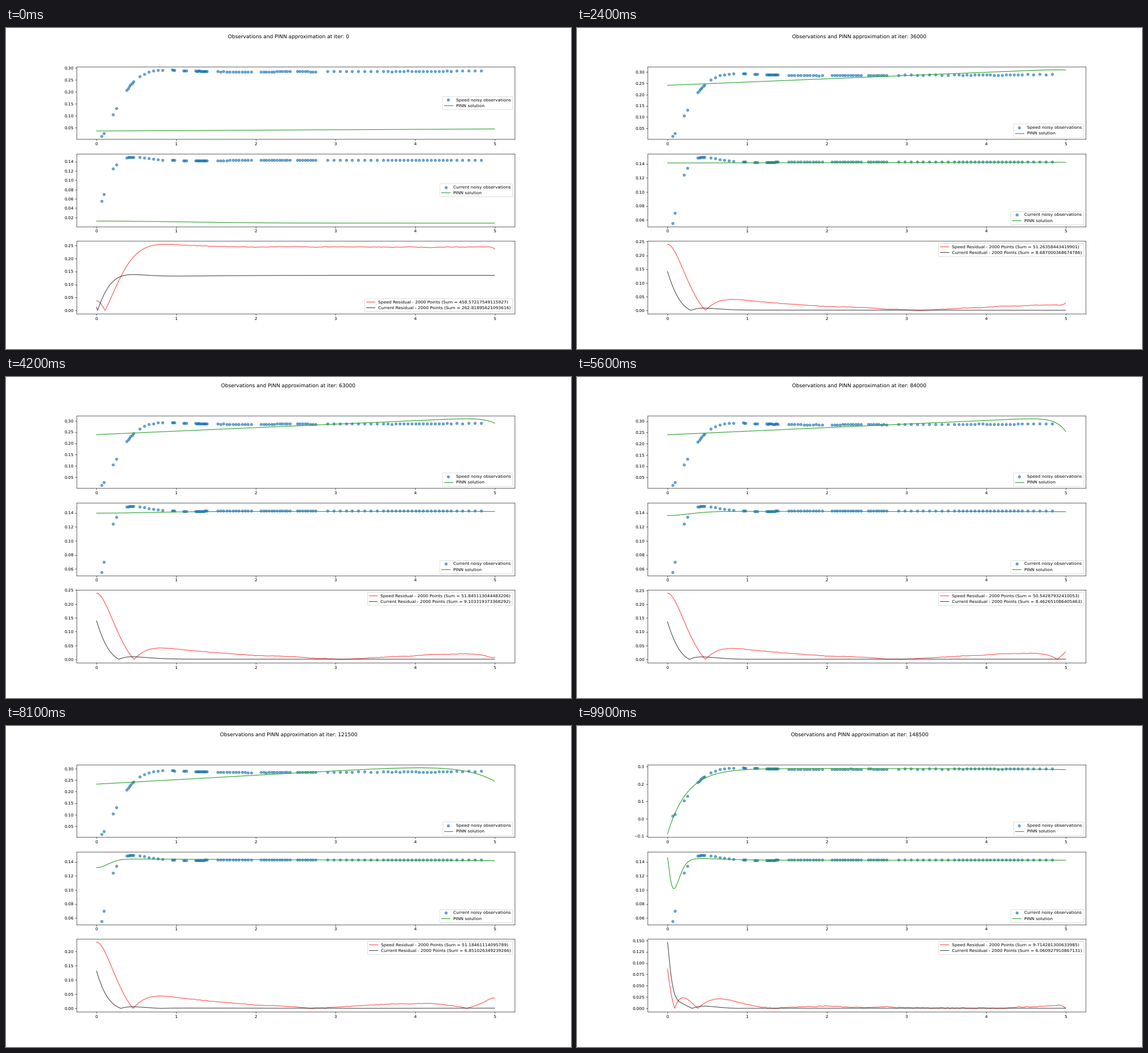
A matplotlib script that plays this animation: 993x564 px, repeating every 10000 ms.

```python
import numpy as np
import matplotlib.pyplot as plt
from matplotlib.animation import FuncAnimation

plt.rcParams["text.hinting"] = "none"
plt.rcParams["font.family"] = "DejaVu Sans"

W, H, DPI = 993, 564, 53.8
FRAMES, STEP = 100, 1500
NAMES = "Speed", "Current"
T = np.linspace(0, 5, 2000)

rng = np.random.default_rng(7)
KNOTS = np.linspace(0, 5, 180)
NOISE = rng.normal(0, .0006, KNOTS.size)
DRIFT = np.interp(KNOTS, np.linspace(0, 5, 25), rng.normal(0, .0011, 25))


def step_response(t, gain, decay, w, b):
    return gain * (1 - np.exp(-decay * t) * (np.cos(w * t) + b * np.sin(w * t)))


def speed(t):
    """Measured motor speed: damped step response with sensor noise."""
    noise = np.interp(t, KNOTS, NOISE + DRIFT) * np.clip(2 * t - .6, 0, 1)
    trend = .004 * (t / 5) ** 4 - .01 * np.exp((t - 5) / .03)
    return step_response(t, .285, 4.15, 3.65, 1.137) + trend + noise


def current(t):
    return step_response(t, .1427, 5.6, 4.4, -.233)


# Observations come in clumps: first time, last time, count
CLUMPS = [(.067, .089, 2), (.21, .249, 2), (.38, .464, 6), (.54, .825, 6),
          (.95, .975, 3), (1.09, 1.125, 3), (1.243, 1.386, 12),
          (1.52, 1.94, 12), (2.065, 2.43, 12), (2.52, 2.75, 8),
          (2.9, 3.6, 10), (3.66, 4.45, 17), (4.52, 4.827, 5)]
OBS_T = np.concatenate([np.linspace(*c) for c in CLUMPS])
TRUTH = speed(T), current(T)
OBS = speed(OBS_T), current(OBS_T)

# Training state at key frames:
#   speed start, slope, end drop, drop width, initial dip;
#   current level, slope, lag, lag width, notch; both residual sums
STAGES = {
    0: (.0368, .0017, 0, .15, 0, .0077, 0, -.0045, 1.5, 0,
        458.57217549115927, 262.81895621093616),
    15: (.238, .0155, .0215, .19, 0, .1413, .0001, 0, 1, 0,
         51.04928017669871, 9.061036985393427),
    24: (.2405, .0145, .0047, .15, 0, .1413, .0002, 0, 1, 0,
         51.26358443419901, 8.687000368674786),
    42: (.2385, .0155, .027, .14, 0, .142, 0, .0024, .9, 0,
         51.845113044483206, 9.103319373368292),
    56: (.2394, .016, .065, .127, 0, .1422, -.0001, .006, .38, 0,
         50.54287932410053, 8.462651086405463),
    81: (.233, .0194, .0845, .395, 0, .1443, -.0005, .0125, .2, 0,
         51.18461114095789, 6.851026349239266),
    99: (.2895, -.0002, .006, 1, .377, .1424, 0, -.0035, .75, .044,
         9.714281300633985, 6.060927910867131),
}
KEYS = list(STAGES)
STATES = np.array(list(STAGES.values()))


def state(k):
    """Blend neighbouring stages; the first and last blends settle early."""
    j = min(np.searchsorted(KEYS, k, "right") - 1, len(KEYS) - 2)
    s = (k - KEYS[j]) / (KEYS[j + 1] - KEYS[j])
    if j == 0:
        s = 1 - np.exp(-1.5 * k)
    elif j == len(KEYS) - 2:
        s = 1 - (1 - s) ** 4
    return (1 - s) * STATES[j] + s * STATES[j + 1]


def solve(v0, slope, drop, width, dip, c0, c_slope, lag, lag_width, notch):
    v = v0 + slope * T - drop * np.exp((T - 5) / width) - dip * np.exp(-T / .247)
    x = (T / .08) ** 1.3
    c = (c0 + c_slope * T - lag * np.exp(-(T / lag_width) ** 2)
         - notch * x * np.exp(1 - x))
    return v, c


def fit_y(ax, *data):
    lo = min(d.min() for d in data)
    hi = max(d.max() for d in data)
    pad = .05 * (hi - lo)
    ax.set_ylim(lo - pad, hi + pad)


fig, axes = plt.subplots(3, 1, figsize=((W + .01) / DPI, (H + .01) / DPI), dpi=DPI)
title = fig.suptitle("")
lines, residuals = [], []
for ax, name, obs in zip(axes, NAMES, OBS):
    ax.scatter(OBS_T, obs, alpha=.65, label=f"{name} noisy observations")
    lines += ax.plot(T, 0 * T, color="tab:green", label="PINN solution")
for name, color in zip(NAMES, ("red", "black")):
    residuals += axes[2].plot(T, 0 * T, color=color, alpha=.7, label=name)
for ax in axes:
    ax.set_xlim(-.25, 5.25)
legends = [ax.legend(loc="lower right") for ax in axes]


def update(k):
    title.set_text(f"Observations and PINN approximation at iter: {k * STEP}")
    *params, sum_v, sum_c = state(k)
    sols = solve(*params)
    res = [np.abs(s - t) for s, t in zip(sols, TRUTH)]
    for ax, line, sol, obs in zip(axes, lines, sols, OBS):
        line.set_ydata(sol)
        fit_y(ax, sol, obs)
    fit_y(axes[2], *res)
    labels = legends[2].get_texts()
    for line, r, label, name, total in zip(residuals, res, labels, NAMES,
                                           (sum_v, sum_c)):
        line.set_ydata(r)
        label.set_text(f"{name} Residual - {T.size} Points (Sum = {total})")
    places = ("center right", "lower right") if k == 0 else ("lower right", "upper right")
    for legend, place in zip(legends, (places[0], *places)):
        legend.set_loc(place)
    return []


anim = FuncAnimation(fig, update, frames=FRAMES, init_func=lambda: update(0),
                     interval=100, repeat=True, repeat_delay=0, blit=False)
plt.show()
```
